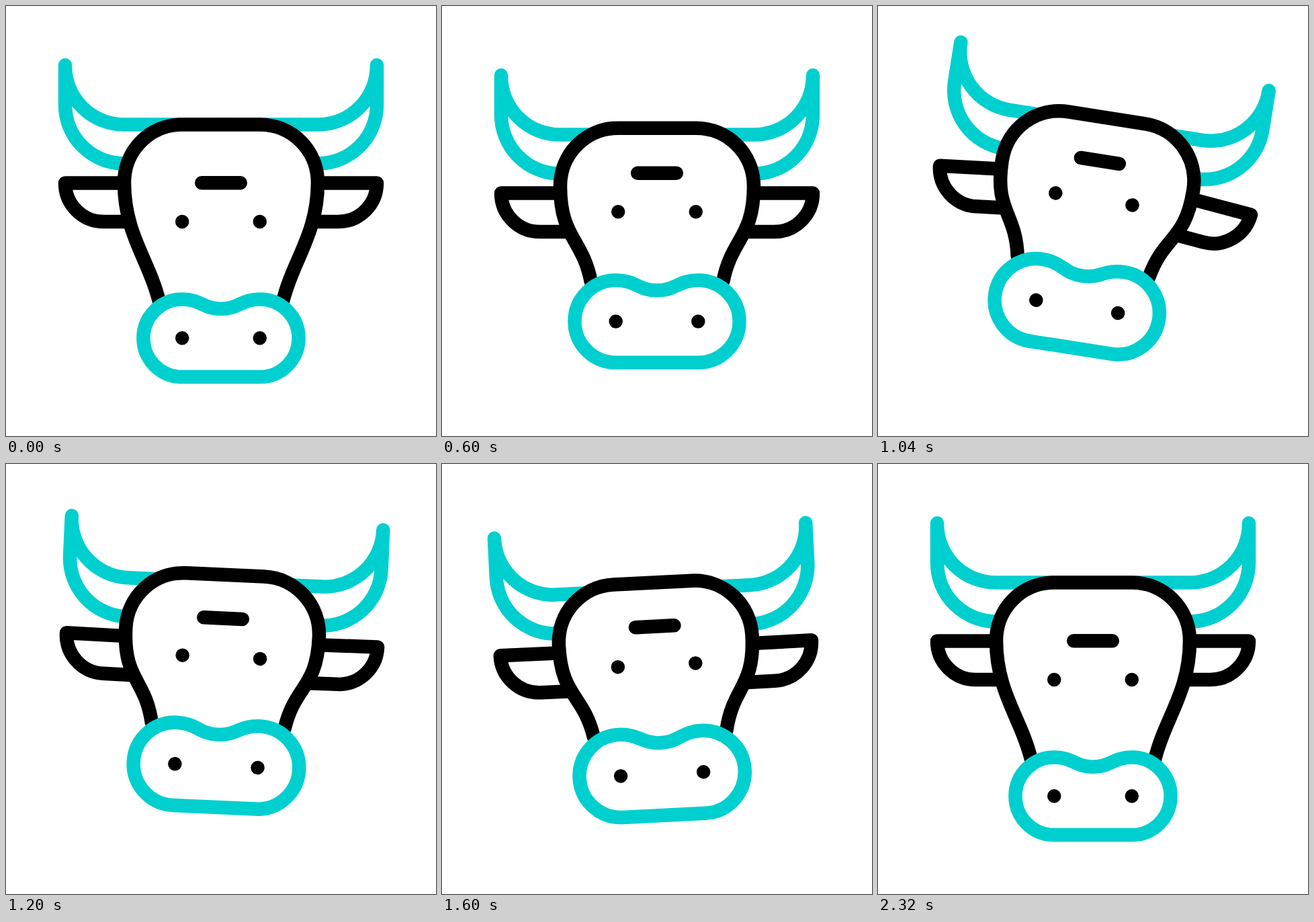
Recreate the animation shown at these times as an HTML page. Size 640x640 px, loop 2.36 s.

```html
<!DOCTYPE html>
<html lang="en">
<head>
<meta charset="utf-8">
<title>Bull</title>
<style>
html, body { margin: 0; width: 100%; height: 100%; overflow: hidden; background: #fff; }
svg { display: block; width: 100%; height: 100%; fill: #fff; stroke: #000; stroke-width: 20.5; stroke-linecap: round; stroke-linejoin: round; }
.teal { stroke: #00cfcf; }
</style>
</head>
<body>
<svg viewBox="0 0 640 640">
  <defs>
    <path id="horn" d="M330 176.5H175.5A87.5 87.5 0 0 1 88 88V147A87.5 87.5 0 0 0 175.5 234.5H220"/>
    <path id="ear" d="M200 263.5H88A57.5 57.5 0 0 0 145.5 321H200"/>
  </defs>
  <g id="bull">
    <g id="horns" class="teal">
      <use href="#horn"/>
      <use href="#horn" transform="matrix(-1 0 0 1 640 0)"/>
    </g>
    <g id="earL"><use href="#ear"/></g>
    <g id="earR"><use href="#ear"/></g>
    <path id="head"/>
    <path id="face" d="M291.2 263.3H348.8M262.2 321h0M377.8 321h0"/>
    <g id="muzzle">
      <path class="teal" d="M-57.8 57.8A57.8 57.8 0 0 1 -57.8 -57.8C-30 -57.8 -26 -43.5 0 -43.5S30 -57.8 57.8 -57.8A57.8 57.8 0 0 1 57.8 57.8Z"/>
      <path d="M-57.8 0h0M57.8 0h0"/>
    </g>
  </g>
</svg>
<script>
const LOOP = 2360, STEP = 40;
const el = id => document.getElementById(id);
const set = (id, name, value) => el(id).setAttribute(name, value);
const move = (id, value) => set(id, 'transform', value);

// Tracks of [time, value] with an ease in and out between keys
const nod = [[20, 0], [740, 1], [1540, 1], [2280, 0]];
const bob = [[0, 0], [620, 5.2], [1040, -11.7], [1280, -11.7], [1790, 5.2], [2280, 0]];
const tilt = [[620, 0], [1040, 8.95], [1400, -6.2], [1780, 0]];
const flap = [[620, 0], [1020, 6], [1340, -5], [1640, 0]];

function at(track, t) {
  const i = track.findIndex(key => key[0] > t);
  if (i < 0) return track[track.length - 1][1];
  if (i === 0) return track[0][1];
  const [t0, a] = track[i - 1], [t1, b] = track[i];
  const x = (t - t0) / (t1 - t0);
  return a + (b - a) * x * x * (3 - 2 * x);
}

function headPath(k) {
  const cx = 214 - 5.5 * k, cy = 380 - 44 * k;
  const x = 228 - 7 * k, y = 440 - 39 * k;
  return `M${x} ${y}C${cx} ${cy} 176 340 176 263` +
    'C176 215 214 176.5 262 176.5H378C426 176.5 464 215 464 263' +
    `C464 340 ${640 - cx} ${cy} ${640 - x} ${y}`;
}

function draw(t) {
  const k = at(nod, t), ear = at(flap, t), scale = 1 + 0.067 * k;
  const drop = `translate(0 ${11 * k})`;
  const earMove = `${drop} rotate(${-ear} 196 292)`;
  move('bull', `translate(0 ${at(bob, t)}) rotate(${at(tilt, t)} 320 308)`);
  move('horns', drop);
  move('earL', earMove);
  move('earR', `matrix(-1 0 0 1 640 0) ${earMove}`);
  set('head', 'd', headPath(k));
  move('face', `translate(0 ${-22 * k})`);
  move('muzzle', `translate(320 ${494.3 - 33.3 * k}) scale(${scale})`);
  set('muzzle', 'stroke-width', 20.5 / scale);
}

const start = performance.now();
function tick() {
  const t = (performance.now() - start) % LOOP;
  draw(Math.floor(t / STEP) * STEP);
  requestAnimationFrame(tick);
}
tick();
</script>
</body>
</html>
```
